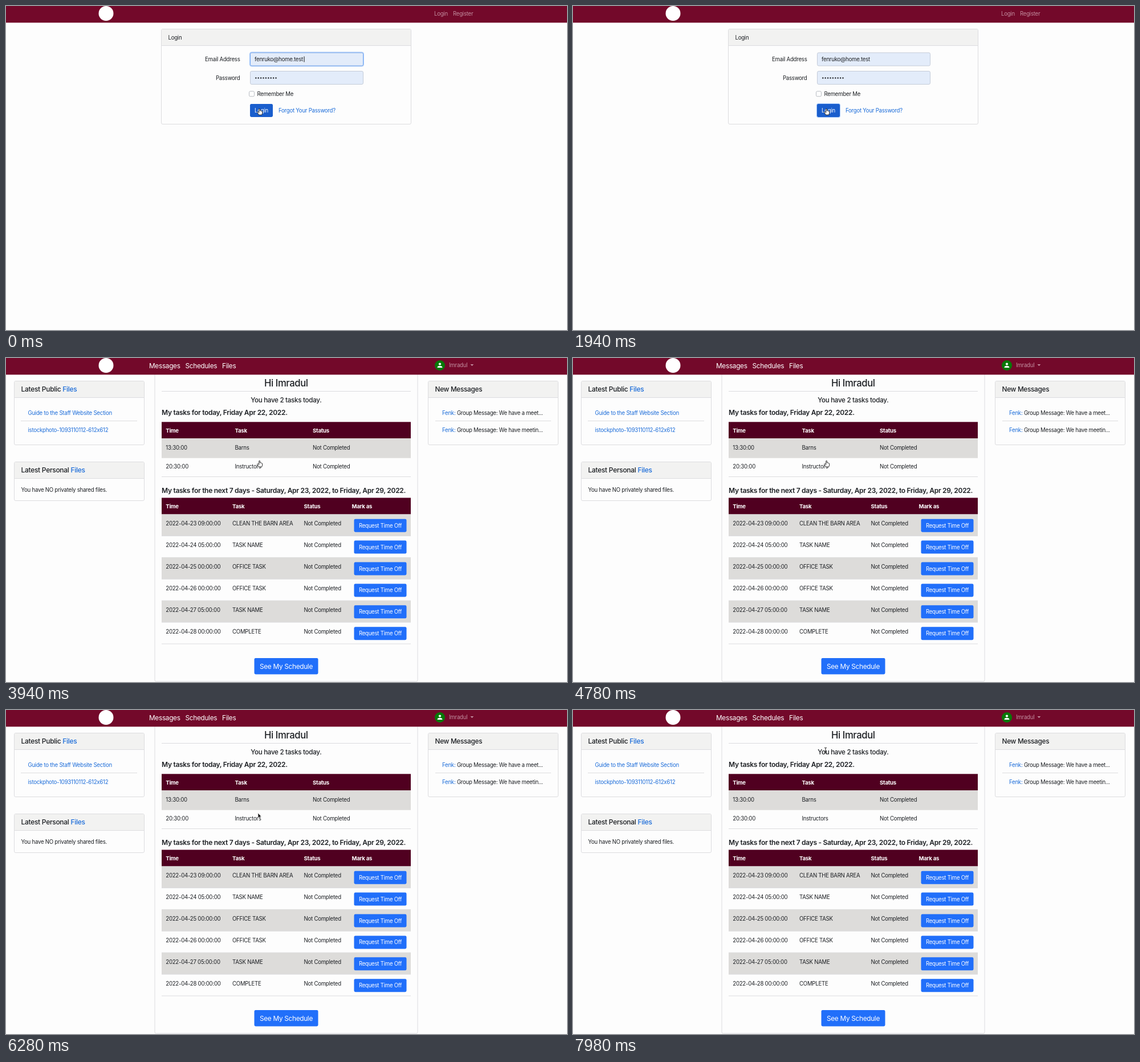
Recreate the animation shown at these times as an HTML page. Size 984 by 569 pixels, loop 8000 ms.

```html
<!DOCTYPE html>
<html lang="en">
<head>
<meta charset="utf-8">
<title>Staff dashboard login</title>
<style>
  html, body { margin: 0; width: 100%; height: 100%; overflow: hidden; background: #fdfdfd; }
  svg { display: block; width: 984px; height: 569px; }
  text { font-family: Inter, Roboto, sans-serif; letter-spacing: -.025em; white-space: pre; }
  .link { fill: #1b6cd9; }
</style>
</head>
<body>
<svg viewBox="0 0 984 569">
  <rect width="984" height="569" fill="#fdfdfd"/>
  <g id="login"></g>
  <g id="dashboard"></g>
  <g id="cursors" stroke-linejoin="round">
    <path id="hand" fill="#fff" stroke="#111" stroke-width=".9"
      d="M-.9 .8Q-.9 0 0 0T.9 .8V3.6Q1.8 3 2.4 3.8Q3.4 3.4 3.8 4.3Q5 4.2 5 5.4V7.4Q5 9 4 10.8H-1.4Q-2 9-3.6 7Q-4.4 5.8-3.4 5.4Q-2.4 5.3-.9 6.8Z"/>
    <path id="arrow" fill="#111" stroke="#fff" stroke-width=".8"
      d="M0 0V9L2 7.2L3.4 10.2L4.9 9.5L3.5 6.6H6.2Z"/>
    <path id="beam" fill="none" stroke="#222" stroke-width="1"
      d="M-2-5Q0-5 0-3.6Q0-5 2-5M0-3.6V3.6M-2 5Q0 5 0 3.6Q0 5 2 5M-1 1.5H1"/>
  </g>
</svg>
<script>
const LOOP = 8000, CLICK = 400, PAGE_READY = 3640, MOVE_START = 6260;
const INK = '#1c1f23', LINE = '#dcdcdf', BLUE = '#216ffa', MAROON = '#73092a', DARK = '#500020', PALE = '#c38fa0';
const BASE = 9.62, MEDIUM = 11.8, LARGE = 12.03;
const $ = id => document.getElementById(id);

const rect = (x, y, w, h, fill, r = 0, stroke = 'none') =>
  `<rect x="${x}" y="${y}" width="${w}" height="${h}" rx="${r}" fill="${fill}" stroke="${stroke}"/>`;
const rule = (x1, x2, y) => `<path d="M${x1} ${y}H${x2}" stroke="${LINE}"/>`;
const link = s => `<tspan class="link">${s}</tspan>`;

// y is the middle of the capital letters
const text = (x, y, s, { size = BASE, weight = 400, fill = INK, anchor = 'start' } = {}) =>
  `<text x="${x}" y="${y + size * .364}" font-size="${size}" font-weight="${weight}" fill="${fill}" text-anchor="${anchor}">${s}</text>`;

const button = (x, y, w, h, label, size = BASE, fill = BLUE) =>
  rect(x, y, w, h, fill, 2.4) + text(x + w / 2, y + h / 2, label, { size, fill: '#fff', anchor: 'middle' });

const card = (x, y, w, h, title, style) =>
  rect(x, y, w, h, '#fdfdfd', 2.4, LINE) +
  rect(x + .5, y + .5, w - 1, 28.5, '#f2f2f1', 2) + rule(x, x + w, y + 29) +
  text(x + 12, y + 14.5, title, style);

const navbar = rect(0, 0, 984, 29.3, MAROON) + '<circle cx="175.5" cy="13" r="13" fill="#fff"/>';

const field = y => rect(428.5, y, 198, 23, '#e3ecfa', 2.4, '#c4cbd8');
const right = { anchor: 'end' };

$('login').innerHTML = navbar +
  text(751, 13.5, 'Login', { fill: PALE }) + text(784, 13.5, 'Register', { fill: PALE }) +
  card(272.5, 40.5, 438, 167, 'Login') +
  text(410.5, 93.5, 'Email Address', right) + text(410.5, 126, 'Password', right) +
  field(82) + field(114.5) +
  `<g id="emailFocus">${rect(427.5, 81, 200, 25, 'none', 3, '#a9cbfb')}${rect(428.5, 82, 198, 23, 'none', 2.4, '#76a9f3')}
    <path d="M523 88.5V98.5" stroke="#111"/></g>` +
  text(436, 93.5, 'fenruko@home.test') +
  Array.from({ length: 9 }, (_, i) => `<circle cx="${438.3 + i * 4.4}" cy="126.4" r="1.2" fill="${INK}"/>`).join('') +
  rect(426.5, 149.8, 9, 9, '#fdfdfd', 2, '#b8bcc2') +
  text(440.5, 154.5, 'Remember Me') +
  `<g id="buttonFocus">${rect(427, 171, 42, 25, '#a5c8fb', 3.5)}</g>` +
  button(428, 172, 40, 23, 'Login', BASE, '#1a5ecd') +
  text(478, 183.8, link('Forgot Your Password?'));

const heading = { size: LARGE, weight: 500 };
const bold = { size: LARGE, weight: 600 };

function tableHead(y, columns) {
  return rect(273, y, 437, 29, DARK) + columns.map(([x, s]) =>
    text(x, y + 14.7, s, { weight: 700, fill: '#fff' })).join('');
}

const weekTasks = [
  ['23 09', 'CLEAN THE BARN AREA'], ['24 05', 'TASK NAME'], ['25 00', 'OFFICE TASK'],
  ['26 00', 'OFFICE TASK'], ['27 05', 'TASK NAME'], ['28 00', 'COMPLETE']
].map(([when, task], i) => {
  const y = 274.5 + i * 37.9;
  return (i % 2 ? '' : rect(273, y, 437, 38, '#dddcda')) + rule(273, 710, y + 38) +
    text(280.3, y + 16, `2022-04-${when}:00:00`) + text(397, y + 16, task) +
    text(522.5, y + 16, 'Not Completed') + button(610.5, y + 8.2, 92, 23, 'Request Time Off');
}).join('');

const todayTasks = [['13:30:00', 'Barns', 157.3], ['20:30:00', 'Instructors', 190.3]].map(([time, task, y]) =>
  text(280.3, y, time) + text(401.5, y, task) + text(538, y, 'Not Completed')).join('');

$('dashboard').innerHTML =
  rect(261, 20, 461, 548, '#fdfdfd', 2.4, LINE) + navbar +
  [[251, 'Messages'], [314.5, 'Schedules'], [379, 'Files']].map(([x, s]) =>
    text(x, 13.5, s, { size: MEDIUM, fill: '#fff' })).join('') +
  `<circle cx="761" cy="13" r="9" fill="#087808"/><circle cx="761" cy="10.6" r="2.1" fill="#fff"/>
   <path d="M756.7 17V16Q757 13.8 761 13.8T765.3 16V17Z" fill="#fff"/>
   <path d="M814.5 11H820.3L817.4 13.9Z" fill="${PALE}"/>` +
  text(777, 12.7, 'Imradul', { fill: PALE }) +

  card(14.5, 40.5, 228, 112, `Latest Public ${link('Files')}`, heading) +
  text(38.5, 96.5, link('Guide to the Staff Website Section')) + rule(26, 230, 110.5) +
  text(38.5, 126, link('istockphoto-1093110112-612x612')) +
  card(14.5, 182.5, 228, 68, `Latest Personal ${link('Files')}`, heading) +
  text(26.5, 231.3, 'You have NO privately shared files.') +

  card(740.5, 40.5, 228, 112, 'New Messages', { size: MEDIUM, weight: 500 }) +
  text(765, 96.8, `${link('Fenk:')} Group Message: We have a meet...`) + rule(753, 956, 110.5) +
  text(765, 126.3, `${link('Fenk:')} Group Message: We have meetin...`) +

  text(491.3, 44, 'Hi Imradul', { size: 16.7, weight: 500, anchor: 'middle' }) + rule(273, 710, 58.5) +
  text(491.3, 73.5, 'You have 2 tasks today.', { size: 11.6, weight: 500, anchor: 'middle' }) +
  text(273, 95.3, 'My tasks for today, Friday Apr 22, 2022.', bold) +
  tableHead(112.3, [[280.3, 'Time'], [401.5, 'Task'], [538, 'Status']]) +
  rect(273, 141.3, 437, 34.4, '#dddcda') + todayTasks + rule(273, 710, 208.5) +
  text(273, 233, 'My tasks for the next 7 days - Saturday, Apr 23, 2022, to Friday, Apr 29, 2022.', bold) +
  tableHead(245.5, [[280.3, 'Time'], [397, 'Task'], [522.5, 'Status'], [606.5, 'Mark as']]) +
  weekTasks + button(435.5, 527, 112, 28.5, 'See My Schedule', MEDIUM);

const show = (id, on) => $(id).style.display = on ? '' : 'none';
const path = [[MOVE_START, 442, 181], [6840, 429, 123.5], [7700, 443, 71]];

function pointerAt(t) {
  const i = t < path[1][0] ? 0 : 1;
  const [t0, x0, y0] = path[i], [t1, x1, y1] = path[i + 1];
  const p = Math.min(1, Math.max(0, (t - t0) / (t1 - t0)));
  const e = p * p * (3 - 2 * p);
  return [x0 + (x1 - x0) * e, y0 + (y1 - y0) * e];
}

function draw(now) {
  const t = now % LOOP;
  const moving = t >= MOVE_START;
  const [x, y] = moving ? pointerAt(t) : [444.6, 180.4];
  const overText = moving && (y < 80 || (y > 88 && y < 103));
  show('login', t < PAGE_READY);
  show('dashboard', t >= PAGE_READY);
  show('emailFocus', t < CLICK);
  show('buttonFocus', t >= CLICK);
  show('hand', !moving);
  show('arrow', moving && !overText);
  show('beam', overText);
  $('cursors').setAttribute('transform', `translate(${x} ${y})`);
  requestAnimationFrame(draw);
}
requestAnimationFrame(draw);
</script>
</body>
</html>
```
